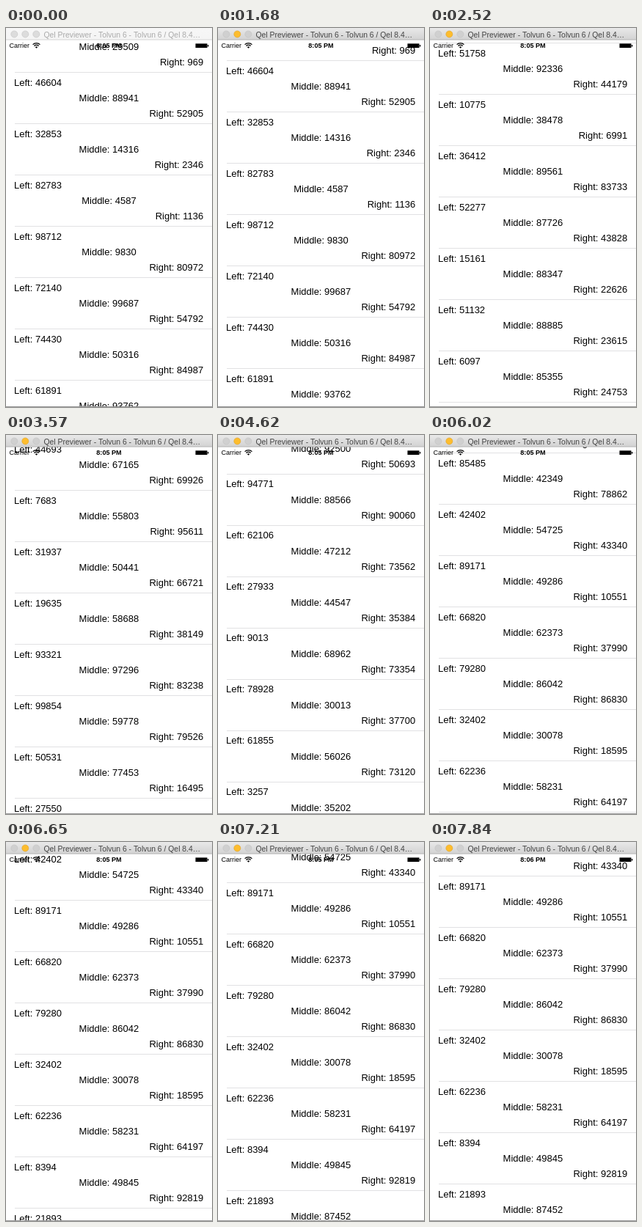
These frames come from a looping animation (281x517 px, 9800 ms). An HTML page with a canvas:

```html
<!DOCTYPE html>
<html lang="en">
<head>
<meta charset="utf-8">
<title>Scrolling list</title>
<style>
  html, body { margin: 0; width: 100%; height: 100%; overflow: hidden; background: #fff; }
  canvas { display: block; }
</style>
</head>
<body>
<canvas id="stage" width="281" height="517"></canvas>
<script>
const W = 281, H = 517, LOOP = 9800, TICK = 70;
const ROW = 70, ROW_COUNT = 46, BAR = 16;
const ACTIVE_AT = 1190, MINUTE_AT = 7350, STOP_AT = 7840;
const SANS = '"Liberation Sans", Arial, sans-serif';
const ctx = document.getElementById('stage').getContext('2d');

// Each row holds three seeded random values below 100000.
let seed = 805;
function randomValue() {
  seed = (seed * 1664525 + 1013904223) % 2 ** 32;
  return Math.floor(seed / 2 ** 32 * 1e5);
}
const rows = Array.from({ length: ROW_COUNT }, () => [randomValue(), randomValue(), randomValue()]);

// Time, offset and speed while the list is being pushed along.
const knots = [
  [1260, 0, 0], [1470, 10, 0], [1610, 10, 0], [2520, 530, .55],
  [3570, 1035, .5], [4620, 1617.3, .7], [5390, 2205.6, .763]
];

// Smooth curve through the knots, then an exponential glide to rest.
function scrollAt(t) {
  if (t <= knots[0][0]) return 0;
  const next = knots.findIndex(k => t < k[0]);
  if (next < 0) return 2607.8 - 402.2 * Math.exp(-(t - 5390) / 527);
  const [t0, y0, v0] = knots[next - 1], [t1, y1, v1] = knots[next];
  const d = t1 - t0, u = (t - t0) / d, ease = u * u * (3 - 2 * u);
  return y0 + (y1 - y0) * ease + d * u * (1 - u) * (v0 * (1 - u) - v1 * u);
}

function rect(x, y, w, h, fill) {
  ctx.fillStyle = fill;
  ctx.fillRect(x, y, w, h);
}

function text(str, x, y, font, align = 'left', fill = '#000') {
  ctx.font = `${font} ${SANS}`;
  ctx.textAlign = align;
  ctx.fillStyle = fill;
  ctx.fillText(str, x, y);
}

function drawList(scroll) {
  rows.forEach(([left, middle, right], i) => {
    const y = i * ROW - 10 - scroll;
    if (y < -ROW || y > H) return;
    rect(12, Math.round(y), W - 12, 1, '#e1e1e3');
    text(`Left: ${left}`, 11, y + 18.7, '13px');
    text(`Middle: ${middle}`, 140.4, y + 39.9, '13px', 'center');
    text(`Right: ${right}`, 269.2, y + 60.9, '13px', 'right');
  });
}

function drawStatus(clock) {
  text('Carrier', 4.5, 27.3, '9px');
  text(clock, 140.5, 27.3, 'bold 9.1px', 'center');

  ctx.strokeStyle = ctx.fillStyle = '#000';
  ctx.lineWidth = 1.3;
  for (const r of [7, 4.4]) {
    ctx.beginPath();
    ctx.arc(41.5, 27.6, r, -Math.PI * .75, -Math.PI * .25);
    ctx.stroke();
  }
  ctx.beginPath();
  ctx.moveTo(41.5, 27.8);
  ctx.arc(41.5, 27.8, 2.4, -Math.PI * .75, -Math.PI * .25);
  ctx.fill();

  rect(258.5, 21.3, 16, 5.7, '#000');
  rect(275, 23, 1.3, 2.5, '#000');
}

function drawTitleBar(active) {
  const shade = ctx.createLinearGradient(0, 0, 0, BAR);
  shade.addColorStop(0, active ? '#e9e9e9' : '#f7f7f7');
  shade.addColorStop(1, active ? '#d2d2d2' : '#f4f4f4');
  rect(0, 0, W, BAR, shade);
  rect(0, BAR - .5, W, 1, active ? '#b4b4b4' : '#d6d6d6');

  const idle = active ? '#d0d0d0' : '#dcdcdc';
  [idle, active ? '#fdbd2e' : idle, idle].forEach((fill, i) => {
    ctx.beginPath();
    ctx.arc(11.3 + 15 * i, 8.4, 4.5, 0, 7);
    ctx.fillStyle = fill;
    ctx.fill();
    ctx.lineWidth = .6;
    ctx.strokeStyle = fill === idle ? '#c2c2c2' : '#dfa023';
    ctx.stroke();
  });
  text('Qel Previewer - Tolvun 6 - Tolvun 6 / Qel 8.4…', 51.5, 12.6, '10.4px',
    'left', active ? '#444' : '#aaa');
}

function draw(t) {
  rect(0, 0, W, H, '#fff');
  drawList(scrollAt(Math.min(t, STOP_AT)));
  drawStatus(t < MINUTE_AT ? '8:05 PM' : '8:06 PM');
  drawTitleBar(t >= ACTIVE_AT);
  rect(0, H - 1, W, 1, '#9a9a9a');
}

const start = performance.now();
function frame() {
  const t = (performance.now() - start) % LOOP;
  draw(Math.floor(t / TICK) * TICK);
  requestAnimationFrame(frame);
}
frame();
</script>
</body>
</html>
```
